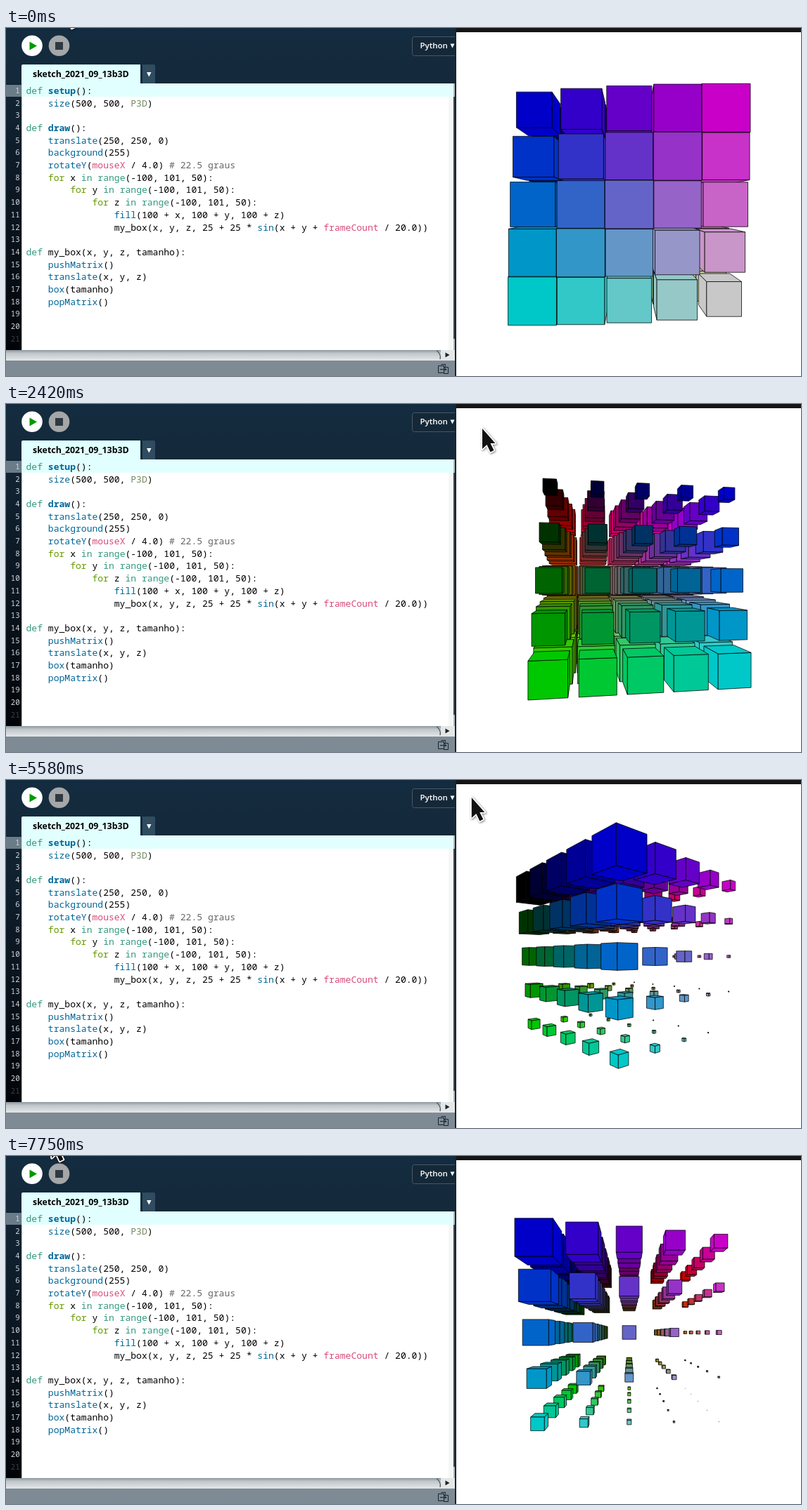
Write an HTML page with a canvas that moves like this. It is 1130x496 px and loops after 7.83 s.

```html
<!DOCTYPE html>
<html lang="en">
<head>
<meta charset="utf-8">
<title>Rotating box grid</title>
<style>
html, body { margin: 0; width: 100%; height: 100%; overflow: hidden; background: #fff; }
#stage { position: relative; width: 1130px; height: 496px; overflow: hidden; }
#stage > * { position: absolute; }
#editor { left: 0; top: 0; }
.ui { font: 600 11.5px "Open Sans", "Noto Sans", sans-serif; }
.tab { font-size: 12.4px; font-weight: 700; }
pre { margin: 0; top: 80.8px; line-height: 17.71px; }
#code { left: 28.5px; font-family: "Noto Sans Mono", "DejaVu Sans Mono", monospace; font-size: 13.05px; color: #000; }
#nums { left: 0; width: 19.5px; text-align: right; font-family: "Noto Sans Mono", "DejaVu Sans Mono", monospace; font-size: 10.6px; color: #cfd8dc; }
#nums span { opacity: .28; }
.type { color: #33997e; }
.flow { color: #669900; }
.call { color: #006699; }
.main { color: #006699; font-weight: 700; }
.var { color: #d94a7a; }
.const { color: #718a62; }
.note { color: #666; }
#view { left: 0; top: 0; }
</style>
</head>
<body>
<div id="stage">
  <svg id="editor" width="1130" height="496">
    <defs>
      <linearGradient id="bar" x2="0" y2="1"><stop stop-color="#142c40"/><stop offset="1" stop-color="#14293a"/></linearGradient>
      <linearGradient id="gutter" x2="0" y2="1"><stop stop-color="#122535"/><stop offset="1" stop-color="#020408"/></linearGradient>
      <linearGradient id="thumb" x2="0" y2="1"><stop stop-color="#8d979e"/><stop offset=".3" stop-color="#bfc5c9"/><stop offset="1" stop-color="#e4e7e8"/></linearGradient>
    </defs>
    <rect width="640" height="79" fill="url(#bar)"/>
    <circle cx="37" cy="25.2" r="14.8" fill="#fff"/>
    <path d="M33.500 19.500v12l10.500 -6z" fill="#090"/>
    <circle cx="75.500" cy="25.200" r="14.800" fill="#a4a6a8"/>
    <rect x="70" y="20" width="11" height="11" fill="#2f3942"/>
    <rect x="577.500" y="12.500" width="70" height="27" rx="3" fill="#142838" stroke="#46586a"/>
    <text class="ui" x="588.500" y="29" fill="#fff">Python</text>
    <path d="M631.500 22.500h6l-3 6z" fill="#fff"/>
    <path d="M22 79V54q0 -2 2 -2H191V79z" fill="#e1fffe"/>
    <text class="ui tab" x="38" y="69.500">sketch_2021_09_13b3D</text>
    <path d="M194 79V52H210q2 0 2 2V79z" fill="#2f4c60"/>
    <path d="M200 63h6.500l-3.250 6.500z" fill="#fff"/>
    <rect y="79" width="22.500" height="380" fill="url(#gutter)"/>
    <rect y="81" width="22.500" height="17" fill="#6a7c87"/>
    <rect x="22.500" y="79" width="615" height="380" fill="#fff"/>
    <rect x="22.500" y="79" width="615" height="19" fill="#e1fffe"/>
    <rect x="629" y="98" width="7" height="361" fill="#f5f6f6"/>
    <rect x="636" y="79" width="2" height="19" fill="#aeb8bc"/>
    <rect x="636" y="98" width="2" height="345" fill="#35414a"/>
    <rect x="636" y="443" width="2" height="16" fill="#aeb8bc"/>
    <rect y="459" width="638" height="15" fill="#e4e7e8"/>
    <rect y="459" width="618" height="15" fill="url(#thumb)"/>
    <path d="M612 459.500q7 6 5 12.500" fill="none" stroke="#59636b" stroke-width="1.500"/>
    <path d="M624.500 462.500v7l6 -3.500z" fill="#222"/>
    <rect y="474" width="638" height="22" fill="#7e8b95"/>
    <g fill="none" stroke="#17222b">
      <path d="M614.500 481.500h8v10h-8zM618.500 479.500h6v3M622.500 483.500h6v9h-6z"/>
      <path d="M617 486.500h9M623.500 484.500l2.500 2l-2.500 2"/>
    </g>
    <rect x="638" width="2" height="496" fill="#18262f"/>
    <rect x="640" width="490" height="6" fill="#151515"/>
    <rect x="640" y="6" width="490" height="490" fill="#fff"/>
  </svg>
  <pre id="nums"></pre>
  <pre id="code">def setup():
    size(500, 500, P3D)

def draw():
    translate(250, 250, 0)
    background(255)
    rotateY(mouseX / 4.0) # 22.5 graus
    for x in range(-100, 101, 50):
        for y in range(-100, 101, 50):
            for z in range(-100, 101, 50):
                fill(100 + x, 100 + y, 100 + z)
                my_box(x, y, z, 25 + 25 * sin(x + y + frameCount / 20.0))

def my_box(x, y, z, tamanho):
    pushMatrix()
    translate(x, y, z)
    box(tamanho)
    popMatrix()</pre>
  <canvas id="view" width="1130" height="496"></canvas>
</div>
<script>
const words = {
  type: 'def in range', flow: 'for', main: 'setup draw', var: 'mouseX frameCount', const: 'P3D',
  call: 'size translate background rotateY fill sin pushMatrix box popMatrix'
};
const kinds = {};
for (const kind in words) for (const w of words[kind].split(' ')) kinds[w] = kind;
const code = document.getElementById('code');
code.innerHTML = code.textContent.replace(/#.*|\w+/g, w => {
  const kind = w[0] === '#' ? 'note' : kinds[w];
  return kind ? `<span class="${kind}">${w}</span>` : w;
});
document.getElementById('nums').innerHTML =
  Array.from({ length: 20 }, (_, i) => i + 1).join('\n') + '\n<span>21</span>';

const LOOP = 7830, TICK = 1000 / 12, LAST = 93;
const held = new Set([25, 26, 27, 28, 46, 50, 55, 60, 63, 74, 75, 83, 86, 88, 92]);

// Keys: [tick, value, ...]
const phaseKeys = [[0, 1.555], [11, 4.3], [29, 8.83], [44, 12.62], [57, 15.8], [73, 19.87], [93, 24.72]];
const mouseKeys = [[21, 0], [24, 13], [29, 32], [31, 40], [38, 42], [44, 46], [45, 47], [48, 53], [49, 55],
  [51, 57], [54, 59], [56, 60], [57, 61], [59, 63], [62, 63], [71, 0]];
const cursorKeys = [[0, 81, -35], [11, 154, -23], [14, 142, -23], [17, 260, -38], [20, 623, 36], [24, 655, 35],
  [29, 676, 33], [38, 681, 31], [44, 688, 31], [49, 692, 30], [54, 696, 30], [57, 699, 30], [62, 699, 28],
  [73, 615, 17], [75, 615, 17], [82, 150, -15], [84, 69, -28], [87, 67, -28], [89, 64, -28]];

function track(keys, k, dim = 1) {
  const i = keys.findIndex(key => key[0] > k);
  if (i === 0) return keys[0][dim];
  if (i < 0) return keys[keys.length - 1][dim];
  const a = keys[i - 1], b = keys[i];
  return a[dim] + (b[dim] - a[dim]) * (k - a[0]) / (b[0] - a[0]);
}

const ctx = document.getElementById('view').getContext('2d');
const EYE = 250 / Math.tan(Math.PI / 6), ZOOM = 0.98, CX = 885.8, CY = 251.5;
const steps = [-100, -50, 0, 50, 100];
// Each face: normal axis and sign
const faces = [0, 1, 2].flatMap(axis => [[axis, -1], [axis, 1]]);
const around = [[-1, -1], [1, -1], [1, 1], [-1, 1]];

function drawBoxes(angle, phase) {
  const c = Math.cos(angle), s = Math.sin(angle);
  const eye = [-EYE * s, 0, EYE * c];
  const project = ([x, y, z]) => {
    const f = EYE * ZOOM / (EYE + x * s - z * c);
    return [CX + (x * c + z * s) * f, CY + y * f];
  };
  const boxes = [];
  for (const x of steps) for (const y of steps) for (const z of steps) {
    boxes.push({ pos: [x, y, z], dist: Math.hypot(x - eye[0], y, z - eye[2]) });
  }
  boxes.sort((a, b) => b.dist - a.dist);

  ctx.lineWidth = 0.75;
  ctx.lineJoin = 'round';
  ctx.strokeStyle = '#000';
  for (const { pos } of boxes) {
    const half = (25 + 25 * Math.sin(pos[0] + pos[1] + phase)) / 2;
    ctx.fillStyle = `rgb(${pos.map(v => v + 100)})`;
    for (const [axis, sign] of faces) {
      if (sign * (eye[axis] - pos[axis]) <= half) continue;
      const u = (axis + 1) % 3, v = (axis + 2) % 3;
      ctx.beginPath();
      for (const [du, dv] of around) {
        const p = pos.slice();
        p[axis] += sign * half;
        p[u] += du * half;
        p[v] += dv * half;
        ctx.lineTo(...project(p));
      }
      ctx.closePath();
      ctx.fill();
      ctx.stroke();
    }
  }
}

const arrow = new Path2D('M1 2V31L7.500 25L12.500 35.500L17.500 33L12.500 23H19.500Z');
function drawCursor(x, y) {
  ctx.save();
  ctx.translate(x, y);
  ctx.lineWidth = 3.5;
  ctx.strokeStyle = '#fff';
  ctx.fillStyle = '#111';
  ctx.shadowColor = 'rgba(0,0,0,.5)';
  ctx.shadowBlur = 3;
  ctx.shadowOffsetX = ctx.shadowOffsetY = 1;
  ctx.stroke(arrow);
  ctx.shadowColor = 'transparent';
  ctx.fill(arrow);
  ctx.restore();
}

const start = performance.now();
let shown = -1;
function frame() {
  const t = (performance.now() - start) % LOOP;
  let k = Math.min(LAST, Math.floor((t + 4) / TICK));
  while (held.has(k)) k--;
  if (k !== shown) {
    shown = k;
    ctx.clearRect(0, 0, 1130, 496);
    drawBoxes(Math.round(track(mouseKeys, k)) / 4, track(phaseKeys, k));
    drawCursor(track(cursorKeys, k), track(cursorKeys, k, 2));
  }
  requestAnimationFrame(frame);
}
frame();
</script>
</body>
</html>
```
